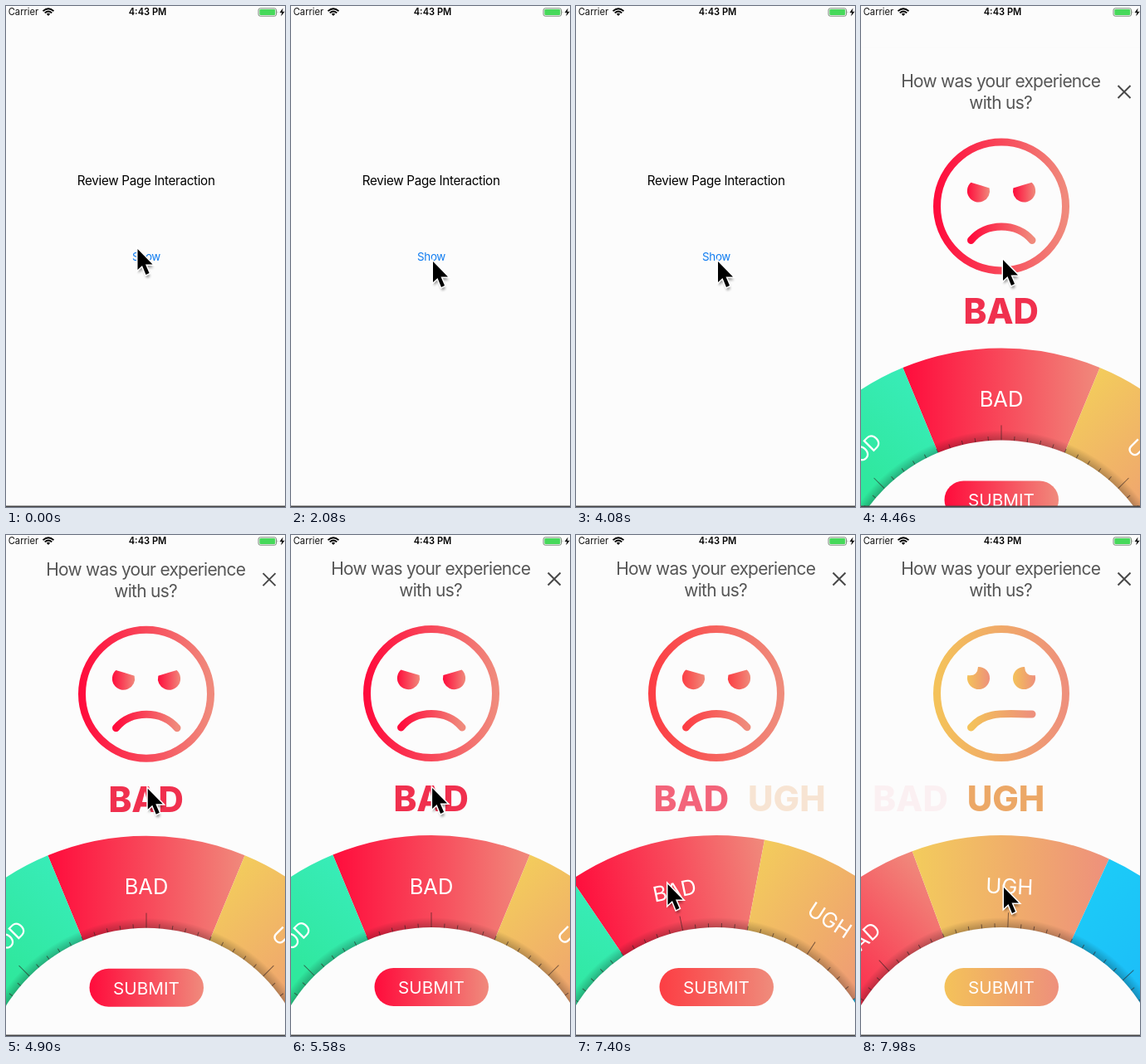
An HTML page for the animation above (8000 ms loop, 336 by 604 pixels).

```html
<!DOCTYPE html>
<html lang="en">
<head>
<meta charset="utf-8">
<title>Review page interaction</title>
<style>
  html, body { margin: 0; width: 100%; height: 100%; overflow: hidden; background: #fcfcfc; }
  svg { display: block; width: 100vw; height: 100vh; }
  text { font-family: Inter, Roboto, sans-serif; text-anchor: middle; }
  .page { fill: #fcfcfc; }
  .heading { font-size: 20.9px; letter-spacing: -.7px; fill: #555; }
  .word { font-size: 42px; font-weight: 800; }
  .label { font-size: 25.5px; font-weight: 400; fill: #fff; }
</style>
</head>
<body>
<svg viewBox="0 0 336 604">
  <defs>
    <linearGradient id="mood"><stop/><stop offset=".5"/><stop offset="1"/></linearGradient>
    <radialGradient id="shade" gradientUnits="userSpaceOnUse" cx="0" cy="0" r="211">
      <stop offset=".94" stop-color="#000" stop-opacity=".26"/>
      <stop offset="1" stop-color="#000" stop-opacity="0"/>
    </radialGradient>
    <filter id="soft" x="-50%" y="-50%" width="200%" height="200%"><feGaussianBlur stdDeviation="1.8"/></filter>
    <path id="arrow" d="M0 0V25L5.5 20 10 31l4-2-4.5-10.5H18Z"/>
  </defs>
  <rect class="page" width="336" height="604"/>

  <text x="168.7" y="216" font-size="15.2" letter-spacing="-.3">Review Page Interaction</text>
  <text id="show" x="169" y="307" font-size="13.4" letter-spacing="-.3">Show</text>

  <g id="sheet">
    <rect class="page" width="336" height="604"/>
    <text class="heading" x="168.2" y="48">How was your experience</text>
    <text class="heading" x="168.2" y="74">with us?</text>
    <path d="M309.5 45.5l15 15m0-15l-15 15" stroke="#484848" stroke-width="2"/>
    <g fill="none" stroke="url(#mood)" stroke-width="9" stroke-linecap="round">
      <circle cx="169" cy="191" r="77.5"/>
      <path id="mouth"/>
    </g>
    <path id="leftEye" fill="url(#mood)"/>
    <path id="rightEye" fill="url(#mood)"/>
    <g id="words"></g>
    <g transform="translate(169 672)">
      <g id="wheel"></g>
      <circle class="page" r="199"/>
    </g>
    <rect x="100.5" y="522" width="137.5" height="46" rx="23" fill="url(#mood)"/>
    <text x="169" y="553" font-size="20.7" fill="#fff">SUBMIT</text>
  </g>

  <g id="status">
    <text x="21" y="11" font-size="11.2" fill="#111">Carrier</text>
    <text x="170.5" y="11" font-size="11.1" font-weight="600">4:43 PM</text>
    <g fill="none" stroke="#000" stroke-width="1.8">
      <path d="M44.5 6.2Q51 .4 57.5 6.2M46.7 8.4Q51 4.600 55.3 8.4"/>
      <path d="M48.8 9.5Q51 7.8 53.2 9.5L51 12Z" fill="#000" stroke="none"/>
    </g>
    <rect x="304" y="2.8" width="21.5" height="9.4" rx="2.2" fill="none" stroke="#7a8a7a"/>
    <rect x="305.3" y="4.1" width="18.9" height="6.8" rx="1.2" fill="#46d95a"/>
    <path d="M326.7 6v3q1.5-1.5 0-3" fill="#7a8a7a"/>
    <path d="M333.5 2.5L329.5 8h2.6l-.8 4.3L335.7 6.8h-2.8z" fill="#111"/>
  </g>
  <rect y="602.5" width="336" height="1.5" fill="#444"/>

  <g id="cursor">
    <use href="#arrow" transform="translate(1 4)" opacity=".4" filter="url(#soft)"/>
    <use href="#arrow" stroke="#fff" stroke-width="3" paint-order="stroke"/>
  </g>
</svg>
<script>
const LOOP = 8000;
const RAD = Math.PI / 180;
const OUTER = 310, INNER = 199, STEP = 45;
const moods = [
  { name: 'BAD', colors: ['#ff0c3c', '#f8485a', '#f08a7c'], word: '#f0304e' },
  { name: 'UGH', colors: ['#f3cc5c', '#f0ae6a', '#ee907c'], word: '#eca460' },
  { name: 'OK', colors: ['#1ccbf8', '#1cc0f8', '#20b0f8'] },
  { name: 'GOOD', colors: ['#28e88c', '#30e8a0', '#38ecb8'] }
];
const $ = id => document.getElementById(id);
const clamp = (v, lo = 0, hi = 1) => Math.min(hi, Math.max(lo, v));
const mix = (a, b, p) => a + (b - a) * p;
const polar = (r, deg) => [r * Math.sin(deg * RAD), -r * Math.cos(deg * RAD)];
const smooth = p => p * p * (3 - 2 * p);
const settle = x => x <= 0 ? 1 : (1 + x) * Math.exp(-x);
const channels = hex => [1, 3, 5].map(i => parseInt(hex.slice(i, i + 2), 16));
const mixColor = (a, b, p) => {
  const to = channels(b);
  return `rgb(${channels(a).map((v, i) => Math.round(mix(v, to[i], p)))})`;
};

function buildWheel() {
  const [x, y] = polar(OUTER, STEP / 2);
  const [u, v] = polar(INNER - 2, STEP / 2);
  const slice = `M${-x} ${y}A${OUTER} ${OUTER} 0 0 1 ${x} ${y}L${u} ${v}A${INNER} ${INNER} 0 0 0 ${-u} ${v}Z`;
  let ticks = '';
  for (let i = -5; i < 5; i++) {
    const [ax, ay] = polar(INNER - 1, i * 4.5);
    const [bx, by] = polar(INNER + (i ? 5 : 18), i * 4.5);
    ticks += `M${ax} ${ay}L${bx} ${by}`;
  }
  const gradients = moods.map(({ colors }, i) =>
    `<linearGradient id="slice${i}">${colors.map((c, k) =>
      `<stop offset="${k / 2}" stop-color="${c}"/>`).join('')}</linearGradient>`).join('');
  let slices = '', details = '';
  for (let i = 0; i < 8; i++) {
    const turn = `transform="rotate(${i * STEP})"`;
    slices += `<path ${turn} d="${slice}" fill="url(#slice${i % 4})"/>`;
    details += `<g ${turn}><path d="${ticks}" stroke="#302020" stroke-opacity=".6"/>
      <text class="label" y="-239.5">${moods[i % 4].name}</text></g>`;
  }
  $('wheel').innerHTML = gradients + slices + '<circle r="211" fill="url(#shade)"/>' + details;
}

buildWheel();
$('words').innerHTML = moods.slice(0, 2).map(m =>
  `<text class="word" y="333" fill="${m.word}">${m.name}</text>`).join('');
const words = [...$('words').children];
const stops = [...$('mood').children];

// Time, x and y of the pointer tip
const cursorPath = [
  [20, 158.5, 293], [800, 171, 308], [4100, 171, 308], [4460, 171, 306], [5860, 170, 305],
  [6400, 161, 425], [6550, 161, 425], [7400, 110.5, 421], [7480, 107, 421], [7940, 172, 425]
];

function cursorAt(t) {
  const next = cursorPath.findIndex(key => key[0] > t);
  if (next === 0) return cursorPath[0].slice(1);
  if (next < 0) return cursorPath.at(-1).slice(1);
  const a = cursorPath[next - 1], b = cursorPath[next];
  const p = smooth((t - a[0]) / (b[0] - a[0]));
  return [mix(a[1], b[1], p), mix(a[2], b[2], p)];
}

function wheelAngle(t) {
  const drag = 11.7 * smooth(clamp((t - 6550) / 850));
  return t < 7420 ? drag : STEP - (STEP - 11.7) * settle((t - 7420) * 0.0078);
}

// A disc whose upper edge is a curve from a to b; side -1 mirrors it
function eyePath(cx, side, p) {
  const cy = 172.5, r = 13.6;
  const point = deg => [cx + side * r * Math.cos(deg * RAD), cy + r * Math.sin(deg * RAD)];
  const [ax, ay] = point(mix(228, 195, p));
  const [bx, by] = point(mix(-15, -92, p));
  const pull = mix(0, 0.8, p);
  const qx = mix((ax + bx) / 2, cx, pull), qy = mix((ay + by) / 2, cy, pull);
  return `M${ax} ${ay}Q${qx} ${qy} ${bx} ${by}A${r} ${r} 0 1 ${side > 0 ? 1 : 0} ${ax} ${ay}Z`;
}

function drawMood(p) {
  const [bad, ugh] = moods;
  stops.forEach((s, i) => s.setAttribute('stop-color', mixColor(bad.colors[i], ugh.colors[i], p)));
  const morph = smooth(clamp((p - 0.2) / 0.75));
  const mouth = [[150, 150], [210, 211], [188, 175], [210, 216], [206, 206], [232, 216]]
    .map(([a, b]) => mix(a, b, morph));
  $('mouth').setAttribute('d', `M132.5 232C${mouth.join(' ')}`);
  $('leftEye').setAttribute('d', eyePath(141.5, 1, morph));
  $('rightEye').setAttribute('d', eyePath(196.5, -1, morph));
  words.forEach((word, i) => {
    word.setAttribute('x', 168.7 + (i - p) * 115);
    word.setAttribute('opacity', 1 - Math.abs(i - p));
  });
}

function draw(t) {
  const angle = wheelAngle(t);
  const pressed = t >= 3580 && t < 3900;
  $('show').setAttribute('fill', pressed ? '#ccdcec' : '#107cf0');
  $('sheet').setAttribute('transform', `translate(0 ${604 * settle((t - 4100) * 0.0114)})`);
  $('wheel').setAttribute('transform', `rotate(${-angle})`);
  drawMood(angle / STEP);
  $('cursor').setAttribute('transform', `translate(${cursorAt(t)})`);
}

const start = performance.now();
function tick() {
  draw((performance.now() - start) % LOOP);
  requestAnimationFrame(tick);
}
tick();
</script>
</body>
</html>
```
